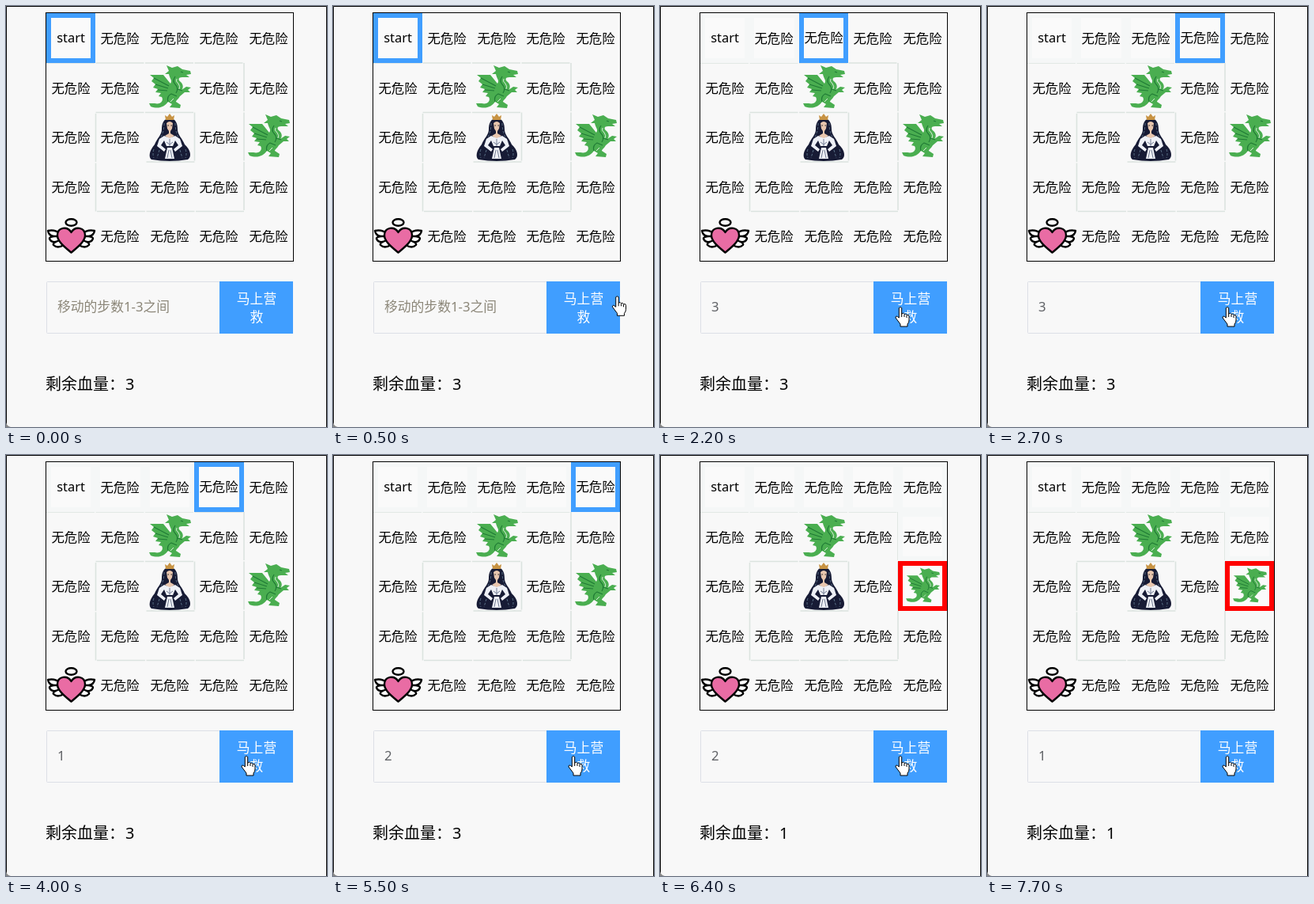
An HTML page that plays this animation: 406x532 px, repeating every 8 s.

```html
<!DOCTYPE html>
<html lang="zh-CN">
<head>
<meta charset="utf-8">
<style>
html, body { margin: 0; height: 100%; overflow: hidden; background: #f8f8f8; }
svg { display: block; width: 100vw; height: 100vh; }
text { font: 16.4px "Noto Sans", "Noto Sans CJK SC", "Noto Sans CJK", sans-serif; fill: #000; }
.mid { text-anchor: middle; }
.form { font-size: 16.8px; }
.big { font-size: 20px; }
</style>
</head>
<body>
<svg viewBox="0 0 406 532">
  <defs>
    <g id="dragon" transform="translate(5 2)" stroke-linejoin="round">
      <path fill="#4aae50" d="M22 1L29 4 36 2 42 6 52 8 53 12 47 13 51 16 42 16C37 16 36 19 40 22C44 26 43 30 41 32L47 28 53 29 49 32 52 35 45 35 39 40C37 44 34 45 34 47L40 51 39 55 26 54 29 50 24 47C20 53 12 57 2 53L0 49 7 49C14 51 19 46 16 41L12 40 15 36 8 35 11 31 5 29 8 25 3 21 6 17 1 13 18 13 27 24C30 20 26 18 25 12L20 12 25 8Z"/>
      <path fill="none" stroke="#1f7a35" stroke-width="1.200" d="M6 17L25 27M8 25L24 30M11 32L23 33M33 15Q29 21 33 25Q38 30 34 36M24 47Q22 40 28 37L35 40M36 31L42 33M40 9L43 10"/>
      <path fill="none" stroke="#d9efda" d="M35 18Q33 21 37 24Q40 28 38 31M31 43L27 47"/>
    </g>
    <g id="queen">
      <path fill="#171b35" d="M31 8C39 8 41 15 41 22C41 29 47 33 50 41C58 48 59 57 54 60Q31 64 8 60C4 57 5 49 12 41C15 33 21 29 21 22C21 15 23 8 31 8Z"/>
      <path fill="none" stroke="#5a7187" stroke-dasharray="3 2" d="M24 14Q24 28 16 38M38 14Q38 28 46 38M11 47Q9 53 11 58M51 47Q53 53 51 58M18 48L15 58M44 48L47 58"/>
      <path fill="#e8c6ae" d="M27 14Q31 10 35 14L34 21 32 24V27L37 30 31 34 25 30 30 27V24L28 21Z"/>
      <path fill="#eef0f6" d="M24 30L31 33 38 30 44 34 47 43 38 50 36 47 42 42 38 36 35 43H27L24 36 20 42 26 47 24 50 15 43 18 34ZM28 45H34L37 59H25Z"/>
      <path fill="none" stroke="#737c93" d="M31 34V43M27 38L31 41 35 38M30 48L28 58M32 48L34 58"/>
      <path fill="#c79343" d="M26 10L25 4 28 6 31 2 34 6 37 4 36 10Z"/>
      <path stroke="#222" d="M28.500 17h1.500M32.500 17H34"/>
    </g>
    <g id="heart" stroke="#000" stroke-width="2.400" stroke-linejoin="round" stroke-linecap="round">
      <ellipse cx="31.500" cy="14.500" rx="7" ry="4.200" fill="#fff"/>
      <g id="wing">
        <path fill="#fff" d="M18 29Q11 23 2 25Q3 31 9 32Q4 33 4 35Q6 40 12 39Q8 41 9 43Q14 48 22 43Z"/>
        <path fill="none" d="M9 32H15M12 39L17 37"/>
      </g>
      <use href="#wing" transform="matrix(-1 0 0 1 63 0)"/>
      <path fill="#e96ca4" d="M31.500 52.500C25 47 14 39 14 31C14 20 27 19 31.500 27C36 19 49 20 49 31C49 39 38 47 31.500 52.500Z"/>
    </g>
  </defs>
  <path fill="none" stroke="#000" d="M.5 532V.5H405.500V532"/>
  <path fill="#888" d="M0 526Q1 531 6 532H0Z"/>
  <path fill="none" stroke="#dbe3df" stroke-width="1.600" stroke-dasharray="61 1.500"
    d="M51 72h250v187.500h-187.500v-125h125v62.500h-62.500"/>
  <g id="board"></g>
  <rect x="50.500" y="8.500" width="313" height="314" fill="none" stroke="#000"/>
  <rect x="51.500" y="348.500" width="219" height="65" rx="1" fill="#f8f8f8" stroke="#dcdfe6"/>
  <text id="field" class="form" x="65" y="386"></text>
  <rect x="270" y="348" width="93" height="66" fill="#409eff"/>
  <text class="mid form" x="317" y="376" style="fill:#fff">马上营</text>
  <text class="mid form" x="317" y="399" style="fill:#fff">救</text>
  <text class="big" x="50" y="485">剩余血量：</text>
  <text id="life" class="big" x="151" y="485"></text>
  <g id="cursor" fill="#fff" stroke="#000" stroke-linejoin="round">
    <path id="hand" d="M-1.700 1.500Q0-.5 1.700 1.500V9Q4 7 5 9.500Q7 8 8 10.500Q11 9.500 11 12V17Q11 20 9 22V25H0V22L-6 14Q-6 10-1.700 14ZM1.700 9V13M5 10V13M8 11V14"/>
    <path id="arrow" d="M0 0V17L4 13 7 19 9.500 18 7 12H12Z"/>
  </g>
</svg>
<script>
const $ = id => document.getElementById(id);
const LOOP = 8000;
const moves = [1700, 2200, 2700, 4400, 6000, 6400];
const inputs = [[1300, "3"], [4000, "1"], [5500, "2"], [7700, "1"]];
const path = [[0, 0], [1, 0], [2, 0], [3, 0], [4, 0], [4, 1], [4, 2]];
const pictures = { "2,1": "dragon", "4,2": "dragon", "2,2": "queen", "0,4": "heart" };
const cellX = c => Math.round(50.75 + 62.5 * c);
const cellY = r => Math.round(9.25 + 62.5 * r);
const bezier = (a, b, c, d, u, v = 1 - u) =>
  a * v * v * v + 3 * b * v * v * u + 3 * c * v * u * u + d * u * u * u;

function cell(c, r, pos) {
  const x = cellX(c), y = cellY(r), w = cellX(c + 1) - x, h = cellY(r + 1) - y;
  const step = path.findIndex(p => p[0] === c && p[1] === r);
  const active = step === pos, picture = pictures[[c, r]];
  let out = "";
  if (step >= 0 && step <= pos) {
    const line = !active ? "#f5f7f7" : picture ? "#f00" : "#409eff";
    out = `<rect x="${x + 3}" y="${y + 3}" width="${w - 6}" height="${h - 6}"
      fill="#fafafa" stroke="${line}" stroke-width="6"/>`;
  }
  if (picture) {
    const place = active ? `translate(${x + 6} ${y + 6}) scale(.81)` : `translate(${x} ${y})`;
    return out + `<use href="#${picture}" transform="${place}"/>`;
  }
  const start = step === 0;
  const base = y + (start || active ? 37 : 38);
  return out + `<text class="mid" x="${x + 31}" y="${base}">${start ? "start" : "无危险"}</text>`;
}

function drawBoard(pos) {
  let out = "";
  for (let i = 0; i < 25; i++) out += cell(i % 5, Math.floor(i / 5), pos);
  $("board").innerHTML = out;
}

let shown = -1;
function draw(now) {
  const t = now % LOOP;
  const pos = moves.filter(m => t >= m).length;
  if (pos !== shown) drawBoard(shown = pos);

  const typed = inputs.filter(i => t >= i[0]).pop();
  $("field").textContent = typed ? typed[1] : "移动的步数1-3之间";
  $("field").style.fill = typed ? "#606266" : "#8b8678";
  $("life").textContent = pos === path.length - 1 ? 1 : 3;

  // the pointer slides down the right edge onto the button in seven steps
  const k = Math.min(7, Math.floor(t / 100)), u = Math.max(0, k - 1) / 6;
  const x = bezier(403, 395, 375, 304, u), y = bezier(70, 390, 370, 380, u);
  const over = x < 363 && y > 348;
  $("cursor").setAttribute("transform", `translate(${x} ${y})`);
  $("cursor").style.display = k ? "" : "none";
  $("hand").style.display = over ? "" : "none";
  $("arrow").style.display = over ? "none" : "";
  requestAnimationFrame(draw);
}
draw(0);
</script>
</body>
</html>
```
